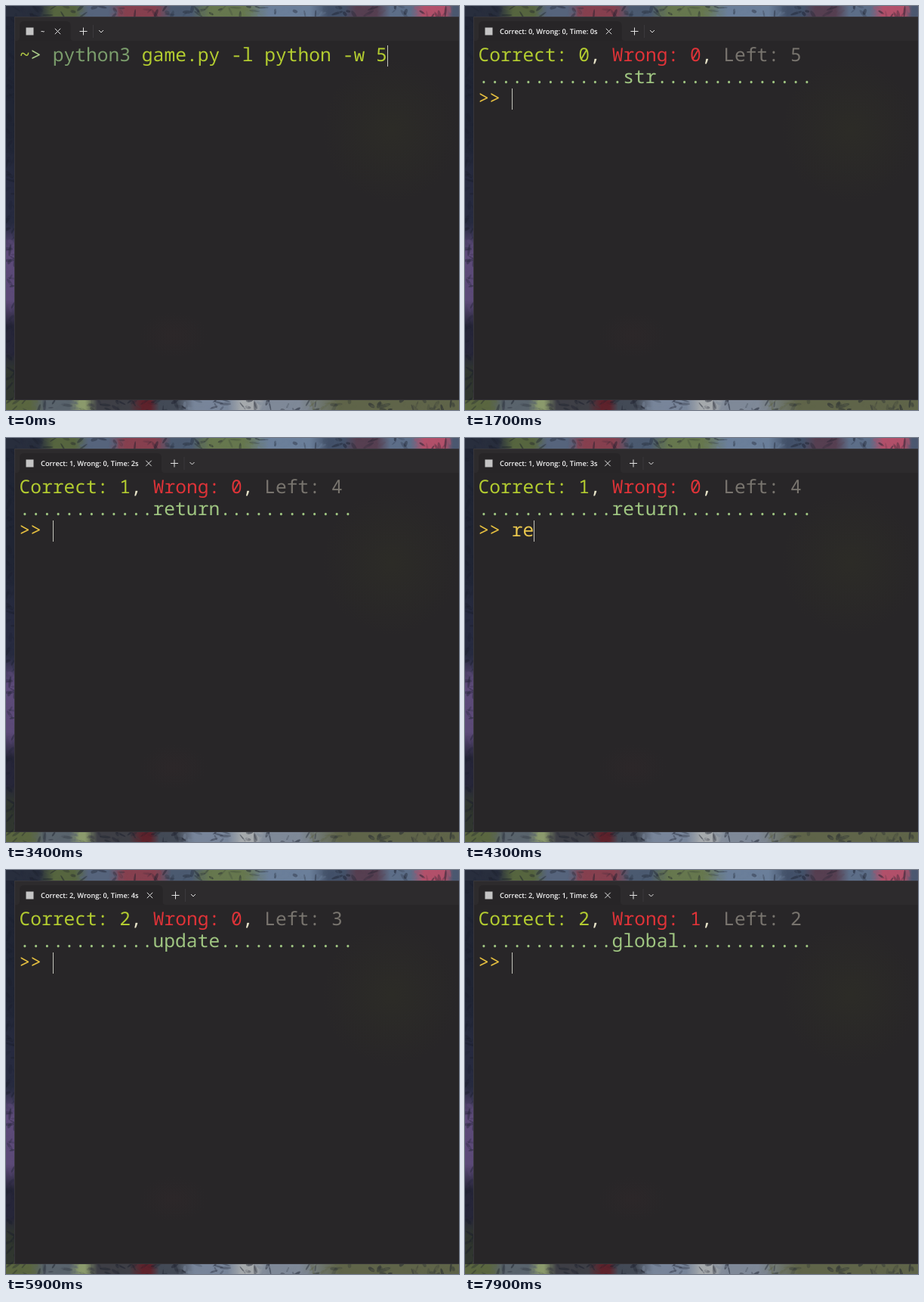
Recreate the animation shown at these times as an HTML page. Size 600 by 534 pixels, loop 8000 ms.

```html
<!DOCTYPE html>
<html lang="en">
<head>
<meta charset="utf-8">
<title>Typing game</title>
<style>
  html, body { margin: 0; width: 100%; height: 100%; overflow: hidden; background: #242838; }
  svg { display: block; width: 600px; height: 534px; }
  text { white-space: pre; text-rendering: geometricPrecision; }
  .mono { font: 24.62px "Noto Sans Mono", "DejaVu Sans Mono", monospace; }
  .label { font: 600 9.3px "Open Sans", "Noto Sans", sans-serif; fill: #f6f6f6; }
</style>
</head>
<body>
<svg id="stage" viewBox="0 0 600 534">
  <defs id="defs">
    <radialGradient id="leafGlow"><stop stop-color="#2f2f26" stop-opacity=".6"/><stop offset="1" stop-color="#2f2f26" stop-opacity="0"/></radialGradient>
    <radialGradient id="redGlow"><stop stop-color="#30282a" stop-opacity=".5"/><stop offset="1" stop-color="#30282a" stop-opacity="0"/></radialGradient>
  </defs>
  <g id="scenery"></g>
  <rect x="11" y="14" width="589" height="507" fill="#282628"/>
  <rect x="11" y="14" width="589" height="32" fill="#2d2b2d"/>
  <ellipse cx="510" cy="165" rx="90" ry="95" fill="url(#leafGlow)"/>
  <ellipse cx="222" cy="435" rx="45" ry="30" fill="url(#redGlow)"/>
  <path d="M600 14.5H11.5V521" fill="none" stroke="#38363b"/>
  <path d="M11 520.5H600" stroke="#343236"/>
  <path id="tab" fill="#272527"/>
  <rect x="26.5" y="28.5" width="10" height="10" fill="#c4c4c4"/>
  <text id="title" class="label" x="46" y="37"></text>
  <g id="controls" fill="none" stroke="#e2e2e2">
    <path d="M-3.7 29.8L3.7 37.2M3.7 29.8L-3.7 37.2"/>
    <path d="M29 33.5H39M34 28.5V38.5"/>
    <path d="M47 25V42" stroke="#3b393c"/>
    <path d="M54.5 32L57.5 35L60.5 32"/>
  </g>
  <g id="screen" class="mono"></g>
  <rect id="cursor" width="1" height="28" fill="#c4c4bc"/>
</svg>
<script>
const LOOP = 8000, SUBMIT = 800, START = 1260;
const LEFT = 17.4, TOP = 52, COL = 14.77, ROW = 28.4, WIDTH = 30;
const C = {
  tilde: '#b4cb45', arrow: '#a8c987', program: '#7b9d6c', lime: '#b3cc30',
  red: '#e03338', grey: '#78746e', pale: '#e6e3c8', word: '#9fc581',
  prompt: '#e5bf40', input: '#e8c64d'
};
const rounds = [
  { at: 1300, word: 'str', right: 0, wrong: 0, typed: 'str', from: 2300, gap: 150 },
  { at: 3000, word: 'return', right: 1, wrong: 0, typed: 'return', from: 3850, gap: 250 },
  { at: 5400, word: 'update', right: 2, wrong: 0, typed: 'sajkdhksjds', from: 5950, gap: 85 },
  { at: 7400, word: 'global', right: 2, wrong: 1, typed: '', from: LOOP, gap: 1 }
];
const $ = id => document.getElementById(id);

function make(tag, attrs, parent) {
  const el = document.createElementNS('http://www.w3.org/2000/svg', tag);
  for (const k in attrs) el.setAttribute(k, attrs[k]);
  return parent.appendChild(el);
}

let seed = 11;
const rand = () => (seed = seed * 16807 % 2147483647) / 2147483647;

// A band of blended colours, brushed over with loose dabs. Patches are [start, size, colour].
function strip(id, x, y, w, h, patches) {
  const upright = h > w, length = upright ? h : w, scene = $('scenery');
  const blend = make('linearGradient', { id, x2: upright ? 0 : 1, y2: upright ? 1 : 0 }, $('defs'));
  for (const [start, size, color] of patches) {
    for (const at of [start + size * .2, start + size * .8]) {
      make('stop', { offset: at / length, 'stop-color': color }, blend);
    }
  }
  make('rect', { x, y, width: w, height: h, fill: `url(#${id})` }, scene);
  for (const [start, size, color] of patches) {
    for (let i = 0; i < size / 3; i++) {
      const along = start + rand() * size, across = rand() * 14;
      const cx = x + (upright ? across : along), cy = y + (upright ? along : across);
      make('ellipse', {
        cx, cy, rx: 3 + rand() * 5, ry: .8 + rand() * 1.6,
        transform: `rotate(${rand() * 180 - 90} ${cx} ${cy})`,
        fill: rand() < .4 ? '#1b1f2c' : color, opacity: .15 + rand() * .35
      }, scene);
    }
  }
}

function scenery() {
  strip('side', 0, 0, 11, 534, [[0, 214, '#202534'], [214, 91, '#272b40'], [305, 105, '#5c4a78'],
    [410, 60, '#262639'], [470, 64, '#30362f']]);
  strip('sky', 0, 0, 600, 14, [[0, 55, '#282e3d'], [55, 45, '#56653f'], [100, 45, '#56647c'],
    [145, 65, '#86404f'], [210, 45, '#4b5a70'], [255, 75, '#66774e'], [330, 90, '#6b7f9a'],
    [420, 35, '#435169'], [455, 45, '#563f51'], [500, 45, '#5d6e88'], [545, 45, '#b2506a'],
    [590, 10, '#4c5870']]);
  strip('ground', 0, 521, 600, 13, [[0, 40, '#5a6640'], [40, 55, '#59636c'], [95, 12, '#8b9a6c'],
    [107, 70, '#3e3f46'], [177, 18, '#5e222b'], [195, 40, '#434a56'], [235, 73, '#78859a'],
    [308, 24, '#a5a9ac'], [332, 70, '#7f8998'], [402, 198, '#5f6449']]);
}

// Each line is a list of [text, colour] runs.
function commandScreen(t) {
  const lines = [[['~', C.tilde], ['> ', C.arrow], ['python3 ', C.program],
    ['game.py -l python -w 5', C.lime]]];
  if (t < SUBMIT) return { title: '~', close: 68.5, lines };
  lines.push([]);
  return { title: '~> python3', close: 114.5, lines };
}

function gameScreen(t) {
  const r = rounds.filter(r => t >= r.at).pop();
  const { right, wrong, word } = r;
  const count = Math.max(0, Math.floor((t - r.from) / r.gap) + 1);
  const title = `Correct: ${right}, Wrong: ${wrong}, Time: ${Math.floor((t - START) / 1000)}s`;
  const before = Math.floor((WIDTH - word.length) / 2);
  return {
    title,
    close: 190.5 - 1.5 * (title.split('1').length - 1),
    lines: [
      [[`Correct: ${right}`, C.lime], [', ', C.pale], [`Wrong: ${wrong}`, C.red], [', ', C.pale],
        [`Left: ${5 - right - wrong}`, C.grey]],
      [['.'.repeat(before) + word + '.'.repeat(WIDTH - before - word.length), C.word]],
      [['>> ', C.prompt], [r.typed.slice(0, count), C.input]]
    ]
  };
}

let shown = '';
function draw(t) {
  const view = t < rounds[0].at ? commandScreen(t) : gameScreen(t);
  const key = JSON.stringify(view);
  if (key === shown) return;
  shown = key;

  const edge = view.close + 17;
  $('title').textContent = view.title;
  $('controls').setAttribute('transform', `translate(${view.close} 0)`);
  $('tab').setAttribute('d', `M14 46Q18 46 18 42V26Q18 20 24 20H${edge - 6}Q${edge} 20 ${edge} 26V42Q${edge} 46 ${edge + 4} 46Z`);

  const screen = $('screen');
  screen.replaceChildren();
  let col = 0;
  view.lines.forEach((line, row) => {
    col = 0;
    for (const [str, fill] of line) {
      make('text', { x: LEFT + col * COL, y: TOP + 21.2 + row * ROW, fill }, screen).textContent = str;
      col += str.length;
    }
  });
  $('cursor').setAttribute('x', Math.round(LEFT + col * COL));
  $('cursor').setAttribute('y', Math.round(TOP + (view.lines.length - 1) * ROW));
}

scenery();
draw(0);
const begin = performance.now();
(function tick() {
  draw((performance.now() - begin) % LOOP);
  requestAnimationFrame(tick);
})();
</script>
</body>
</html>
```
